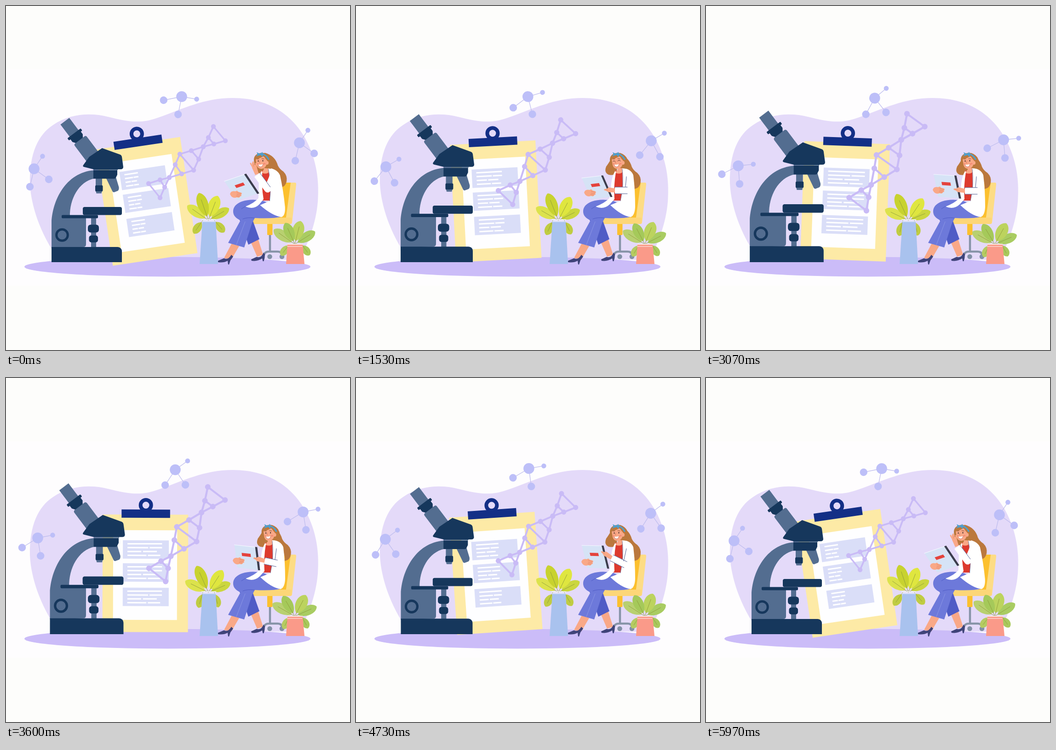
Recreate the animation shown at these times as an HTML page with a canvas. Size 748 by 748 pixels, loop 6.01 s.

```html
<!DOCTYPE html>
<html lang="en">
<head>
<meta charset="utf-8">
<title>Research scene</title>
<style>
  html, body { margin: 0; width: 100%; height: 100%; overflow: hidden; background: #fdfdfb; }
  canvas { display: block; width: 748px; height: 748px; }
</style>
</head>
<body>
<canvas id="stage"></canvas>
<script>
const LOOP = 6010, SIZE = 748, RAD = Math.PI / 180;
const NAVY = '#16375c', SLATE = '#536d90', SKIN = '#f9a887', HAIR = '#bb783d', INK = '#3c4a86';
const canvas = document.getElementById('stage');
const ctx = canvas.getContext('2d');
const ratio = window.devicePixelRatio || 1;
canvas.width = canvas.height = SIZE * ratio;

const mix = (a, b, k) => a + (b - a) * k;
const paths = {};
const path = d => paths[d] || (paths[d] = new Path2D(d));

function fill(color, d) {
  ctx.fillStyle = color;
  ctx.fill(path(d));
}
function stroke(color, width, d) {
  ctx.strokeStyle = color;
  ctx.lineWidth = width;
  ctx.stroke(path(d));
}
function rect(color, x, y, w, h, r = 0) {
  ctx.fillStyle = color;
  ctx.beginPath();
  ctx.roundRect(x, y, w, h, r);
  ctx.fill();
}
function oval(color, x, y, rx, ry = rx, turn = 0) {
  ctx.fillStyle = color;
  ctx.beginPath();
  ctx.ellipse(x, y, rx, ry, turn, 0, 7);
  ctx.fill();
}
function trace(points) {
  ctx.beginPath();
  points.forEach(([x, y], i) => i ? ctx.lineTo(x, y) : ctx.moveTo(x, y));
}
function poly(color, points) {
  trace(points);
  ctx.fillStyle = color;
  ctx.fill();
}
function line(color, width, points) {
  trace(points);
  ctx.strokeStyle = color;
  ctx.lineWidth = width;
  ctx.stroke();
}
function group(draw, x, y, turn = 0, scale = 1) {
  ctx.save();
  ctx.translate(x, y);
  ctx.rotate(turn * RAD);
  ctx.scale(scale, scale);
  draw();
  ctx.restore();
}

function backdrop() {
  rect('#fdfdfb', 0, 0, SIZE, SIZE);
  rect('#fefdfe', 0, 138, SIZE, 470);
  fill('#e4daf9', 'M112 548C75 495 54 435 52 385C51 320 70 280 102 259C140 233 185 232 222 241C260 250 290 258 330 243C385 224 430 200 493 200C580 200 625 245 648 283C672 325 682 370 678 425C674 475 655 520 638 552Z');
  oval('#cbbcf8', 351, 567, 311, 21.5);
}

// One molecule, turning about the middle of its box.
const ATOMS = [[-56, 33, 5.3], [35.7, 39.5, 8.2], [103, 40, 8.2]];
function molecule(x, y, dx, dy, base, turn) {
  group(() => group(() => {
    for (const [a, d, r] of ATOMS) {
      const px = d * Math.cos(a * RAD), py = d * Math.sin(a * RAD);
      line('#bfbdee', 1.3, [[0, 0], [px, py]]);
      oval('#bdbff8', px, py, r);
    }
    oval('#bdbff8', 0, 0, 11.8);
  }, dx, dy, base), x, y, turn);
}

const ROWS = [[[0, 1]], [[0, .6], [.64, 1]], [[0, .4], [.45, .85]], [[0, .55], [.59, .95]]];
function clipboard(p, s) {
  group(() => {
    ctx.translate(-304.2, -408);
    rect('#fdeaa6', 210, 297, 186, 255.5);
    rect('#fefeff', 233, 331, 139, 195);
    for (const y of [353, 403, 456]) {
      rect('#dadef8', 254, y, 100, 40);
      const w = 80 * mix(.37, 1, s);
      ROWS.forEach((row, i) => row.forEach(([a, b]) =>
        rect('#fff', 264 + a * w, y + 6 + i * 8.4, (b - a) * w, 3)));
    }
    ctx.strokeStyle = '#132f86';
    ctx.lineWidth = 8;
    ctx.beginPath();
    ctx.arc(303.8, 276.5, 11.5, 0, 7);
    ctx.stroke();
    rect('#132f86', 251, 286, 105.5, 18);
  }, 304.2, 408, -8.5 + 10.8 * p);
}

function microscope(s) {
  group(() => {
    ctx.translate(-175.5, -557);
    rect(SLATE, 185, 455, 11, 70);
    fill(SLATE, 'M99 526V470C101 425 128 362 192 357V375C158 382 138 420 139 458H174V518Q174 524 168 524Z');
    group(() => {
      rect(SLATE, -12, 0, 24, 36);
      fill(NAVY, 'M-14 38H14V46L9 53H-9L-14 46Z');
      rect(NAVY, -18, 33, 36, 6, 1.5);
      rect(SLATE, -15, 52, 33, 62, 4);
    }, 128, 250.5, -37);
    rect(SLATE, 195, 372, 14, 32);
    rect(NAVY, 194, 390, 16.5, 13, 2);
    rect(SLATE, 196, 403, 12, 4.5, 1.5);
    fill(SLATE, 'M217 373L238 369L245.5 394Q246 400 243 402L235 405Q232 405 231 402Z');
    fill(NAVY, 'M190 357H242V367L239 373Q238 375.5 235 375.5H190Z');
    fill(NAVY, 'M209 309L248 323Q251 324 252 328L255 350Q255 355 249 355H190L170 350Q166 349 168 346L181 328Z');
    rect('#284a70', 190, 355, 53, 1.4);
    rect(NAVY, 167, 437, 85, 17.5, 4);
    rect(NAVY, 121, 454.5, 79, 7, 2);
    rect(NAVY, 178, 475.5, 24, 17, 6);
    rect(NAVY, 180.5, 499, 19.5, 15, 5);
    rect(NAVY, 99, 524, 153, 33, [0, 9, 0, 0]);
    ctx.strokeStyle = NAVY;
    ctx.lineWidth = 5;
    ctx.beginPath();
    ctx.arc(122, 498, 12.3, 0, 7);
    ctx.stroke();
  }, 175.5, 557, 0, 1 + .05 * s);
}

const STRAND_A = [[451, 262], [440, 286], [429, 306], [419, 333], [408, 357], [382, 365], [355, 373], [345, 394], [335, 417]];
const STRAND_B = [[477, 293], [452, 300], [429, 306], [403, 314.5], [378, 322], [368, 345], [355, 373], [335, 378], [310, 386]];
function helix(s) {
  const color = '#c9bbf6';
  group(() => {
    ctx.translate(-393.5, -339.5);
    STRAND_A.forEach((a, i) => line(color, 3.5, [a, STRAND_B[i]]));
    for (const strand of [STRAND_A, STRAND_B]) {
      line(color, 3.7, strand);
      for (const [x, y] of strand) oval(color, x, y, 5.2);
    }
  }, 393.5, 339.5, -14.1 * s, 1 + .18 * s);
}

function leaf(x, y, turn, len, w, color) {
  group(() => {
    ctx.fillStyle = color;
    ctx.beginPath();
    ctx.moveTo(0, -.14 * len);
    ctx.bezierCurveTo(-w * .75, -.38 * len, -w * .7, -.9 * len, 0, -len);
    ctx.bezierCurveTo(w * .7, -.9 * len, w * .75, -.38 * len, 0, -.14 * len);
    ctx.fill();
    line('#8f9c3c', .8, [[0, 0], [0, -.75 * len]]);
  }, x, y, turn);
}
// Leaf rows: root x, root y, angle closed, angle open, length, width, colour.
function plant(leaves, s) {
  for (const [x, y, a, b, len, w, color] of leaves) leaf(x, y, mix(a, b, s), len, w, color);
}
const LIME = [
  [428, 466, -145, -166, 35, 16, '#c0cc42'], [453, 466, 140, 167, 34, 16, '#c0cc42'],
  [440, 466, -55, -65, 56, 20, '#dce24c'], [440, 466, 60, 68, 52, 18, '#cbd63f'],
  [440, 466, 21, 34, 57, 23, '#dfe63f'], [440, 466, -19, -24.5, 63, 22, '#c8d22f']];
const GREEN = [
  [617, 517, -143, -155, 32, 15, '#b5cb62'], [642, 517, 144, 152, 31, 15, '#a9c95c'],
  [628, 518, -55, -61, 56, 20, '#b8d070'], [628, 518, 58, 67, 52, 19, '#a9cc62'],
  [628, 518, 14, 29, 52, 23, '#bcd35e'], [628, 518, -24, -31, 51, 20, '#a5c95a']];

function limePlant(s) {
  plant(LIME, s);
  fill('#a9c2ee', 'M427 468H456L461 561H421Z');
  rect('#f1f4fc', 425, 464, 32, 2);
  rect('#dfe9fb', 426, 468, 30, 1.5);
}
function greenPlant(s) {
  plant(GREEN, s);
  fill('#fa9a89', 'M612 518H645L649 561H609Z');
  rect('#fdebe6', 612, 517, 33, 2);
  rect('#fdd8d0', 611.5, 522, 33, 1.5);
}

function chair() {
  stroke('#8794a8', 4.5, 'M574 495V534M561 541Q563 534 572 534H590Q600 534 600 542');
  oval('#8290a6', 573.5, 545, 5.3);
  oval('#8290a6', 600, 545, 5.3);
  rect('#fcc02e', 568, 473, 11.5, 25, 1.5);
  fill('#fcc02e', 'M596 386Q596 384 599 384H622L614 462H592Z');
  fill('#fddc85', 'M619 384H628Q631.500 384 631 388L622 471Q621.500 474 618 474H607Z');
  rect('#fdd678', 535, 460, 86, 14, 3);
}

function legs() {
  fill(SKIN, 'M491 516L507 522L490 551L474 548Z');
  fill(SKIN, 'M533 515L548 506L559 541L546 545Z');
  fill('#3f4379', 'M461 554L474 548.500Q483 553 490 541L494 545L488 553L485 562H483L482 554Q473 559 461 557Z');
  fill('#3f4379', 'M533 551L545 545.500Q555 549 560 536L563 540Q563 548 560.500 555H558.500L557 549Q546 556 534 554Z');
  fill('#4f5cc6', 'M494 446Q495 458 508 465L527 519L551 507L535 462Z');
  fill('#6d79da', 'M494 445Q495 432 513 425Q535 418 560 424L596 440L600 458Q580 463 541 461L535 472L518 525L483 515L510 466Q493 459 494 445Z');
  stroke('#4f5cc6', 1, 'M512 441Q525 431 547 430M540 461Q525 459 515 463');
  stroke('#8f99e6', .9, 'M520 469L501 519');
}

// Time, head shift, raised arm, book corners (3), holding hand, elbow, wrist, fingers.
const POSES = [
  [0, -14, 1, 475, 381, 519, 366, 547, 408, 500, 409, 569, 398, 546, 367, 541, 353],
  [1530, -1, 0, 491, 374, 534, 369, 554, 415, 509, 406, 590, 401, 563, 401, 553, 400],
  [2300, 0, 0, 492, 374, 536, 370, 554, 417, 508, 406, 590, 402, 563, 402, 553, 402],
  [3070, 1, 0, 495, 366, 541, 369, 551, 418, 506, 400, 590, 402, 563, 402, 552, 400],
  [4070, 4, 0, 498, 360, 544, 367, 547, 417, 506, 395, 588, 404, 562, 394, 551, 390],
  [4730, -1, 0, 491, 364, 535, 365, 547, 414, 503, 400, 586, 406, 556, 391, 545, 384]];
POSES.push([LOOP, ...POSES[0].slice(1)]);

function poseAt(t) {
  const i = Math.max(1, POSES.findIndex(row => row[0] > t));
  const a = POSES[i - 1], b = POSES[i];
  const k = (t - a[0]) / (b[0] - a[0]);
  const e = k * k * (3 - 2 * k);
  const v = a.map((n, j) => mix(n, b[j], e));
  const pt = j => [v[j], v[j + 1]];
  return { shift: v[1], raise: v[2], tl: pt(3), tr: pt(5), br: pt(7), hold: pt(9), elbow: pt(11), wrist: pt(13), tip: pt(15) };
}

function torso(raise) {
  ctx.save();
  const lean = raise * .1;
  ctx.transform(1, 0, lean, 1, -lean * 440, 0);
  fill('#dd3a2e', 'M563 358H581V423H556Z');
  fill(SKIN, 'M569 346H581V360Q573 368 563 362L569 356Z');
  fill('#fff', 'M564 358Q556 370 554 396L551 418Q540 429 521 436Q538 444 552 431L562 420Q560 390 565 362Z');
  fill('#fff', 'M579 352Q598 354 603 368Q607 400 607 437Q606 456 597 459Q577 456 553 433L575 424L580 395Z');
  stroke(INK, .7, 'M579 355Q583 385 575 424');
  ctx.restore();
}

function book({ tl, tr, br, hold }) {
  const at = (u, v) => [0, 1].map(i => tl[i] + u * (tr[i] - tl[i]) + v * (br[i] - tr[i]));
  const quad = (u0, v0, u1, v1) => [at(u0, v0), at(u1, v0), at(u1, v1), at(u0, v1)];
  poly('#d6e3f6', quad(0, 0, 1, 1));
  line('#f5f9ff', 1.2, [at(0, 0), at(1, 0)]);
  poly('#3b3c4c', quad(.98, -.01, 1.08, 1.01));
  poly('#e4433c', quad(.3, .32, .72, .46));
  const [x, y] = hold;
  group(() => {
    fill(SKIN, 'M-13 0Q-11 -8 -1 -6Q3 -9 5 -5L12 -3Q14 0 11 1Q14 4 9 5Q8 9 2 7Q-8 11 -13 0Z');
    stroke('#d9795f', .7, 'M2 -3L11 -1M2 1L10 2M1 4L8 5');
  }, x, y);
}

function arm({ raise, elbow, wrist, tip }) {
  const shoulder = [592 - 10 * raise, 367];
  const turn = Math.atan2(tip[1] - wrist[1], tip[0] - wrist[0]) / RAD;
  group(() => {
    fill(SKIN, 'M-14 -4L0 -5Q5 -6 8 -3L13 -2Q15 0 12 1L7 2Q6 6 0 5L-14 4Z');
    ctx.globalAlpha = raise;
    line(SKIN, 3, [[2, -3], [13, -5]]);
    line(SKIN, 3, [[2, 1], [14, 1]]);
    line(SKIN, 3, [[0, 3], [9, 6]]);
    ctx.globalAlpha = 1;
    stroke('#d9795f', .6, 'M5 -1L11 0');
  }, tip[0], tip[1], turn);
  ctx.lineCap = 'butt';
  line('#fff', 15, [shoulder, elbow, wrist]);
  ctx.lineCap = 'round';
  oval('#fff', ...shoulder, 7.5);
  const dx = wrist[0] - elbow[0], dy = wrist[1] - elbow[1], len = Math.hypot(dx, dy);
  const nx = -dy / len * 7.2, ny = dx / len * 7.2;
  line(INK, .9, [[elbow[0] + nx, elbow[1] + ny], [wrist[0] + nx, wrist[1] + ny]].map(([x, y]) => [x, y]));
  ctx.globalAlpha = 1 - raise;
  line(INK, .9, [[elbow[0] - nx, elbow[1] - ny], [wrist[0] - nx, wrist[1] - ny]]);
  line(INK, .9, [[588, 371], [elbow[0] - 4, elbow[1] - 8]]);
  ctx.globalAlpha = 1;
}

function backHair({ shift, raise }) {
  group(() => fill(HAIR, 'M571 322Q594 328 600 350Q604 358 612 363Q621 372 619 384Q617 396 605 398Q608 388 600 374Q592 360 580 352Z'),
    -6 * raise + shift * .2, -3 * raise);
  group(() => fill(HAIR, 'M556 332Q549 344 545 349Q541 359 546 364Q551 369 560 367Q568 366 569 350Z'),
    shift + 8 * raise, -4 * raise);
}

function head(shift, closed) {
  group(() => {
    fill(HAIR, 'M554 342Q550 326 562 321Q578 315 589 329Q597 342 590 354L572 352Z');
    fill(SKIN, 'M557 333Q560 326 570 326Q581 328 582 338Q581 351 571 354Q562 355 559 346Z');
    oval(SKIN, 582, 341, 3, 4);
    fill(HAIR, 'M554 341Q553 326 565 321Q579 318 587 330Q588 338 584 338Q578 333 574 326Q568 331 558 333Z');
    stroke('#4c9fd0', 3.2, 'M568 321Q579 322 585 333');
    fill('#4c9fd0', 'M568 322L559 318L561 323L557 327L568 324L572 329L573 322L571 317Z');
    oval('#f48b75', 576, 343, 2.6, 1.8);
    oval('#f48b75', 561, 343, 1.6, 1.6);
    if (closed) {
      stroke('#4b2d29', 1, 'M560 338Q562 335 564 338M570 337Q573 334 576 337');
    } else {
      oval('#3d2929', 562.5, 337, 1.1, 1.6);
      oval('#3d2929', 572.5, 336.5, 1.1, 1.6);
    }
    stroke('#77462f', .9, 'M560 333L564 332.500M570 332L575 332.500');
    stroke('#d9775c', .9, 'M566 337L564.500 341L566.500 341.500');
    fill('#fff', 'M562 344.500Q567 346 573 343.500Q572 350 567 350Q563 349 562 344.500Z');
    stroke('#b84e43', .7, 'M562 344.500Q563 349 567 350Q572 350 573 343.500');
  }, shift, 0);
}

function woman(t) {
  const pose = poseAt(t);
  backHair(pose);
  legs();
  torso(pose.raise);
  head(pose.shift, t > 1380 && t < 1680);
  book(pose);
  arm(pose);
}

function draw(t) {
  const p = 1 - Math.abs(1 - 2 * t / LOOP);
  const s = (1 - Math.cos(2 * Math.PI * t / LOOP)) / 2;
  ctx.setTransform(ratio, 0, 0, ratio, 0, 0);
  ctx.lineCap = ctx.lineJoin = 'round';
  backdrop();
  molecule(378, 215, 4, -18, 65.7, -50 * s);
  molecule(72.5, 360.5, -11.5, -6.5, 0, 50 * s);
  molecule(649.5, 304, -11.5, -6.5, 0, 50 * s);
  clipboard(p, s);
  microscope(s);
  helix(s);
  limePlant(s);
  chair();
  greenPlant(s);
  woman(t);
}

const start = performance.now();
function tick() {
  draw((performance.now() - start) % LOOP);
  requestAnimationFrame(tick);
}
tick();
</script>
</body>
</html>
```
